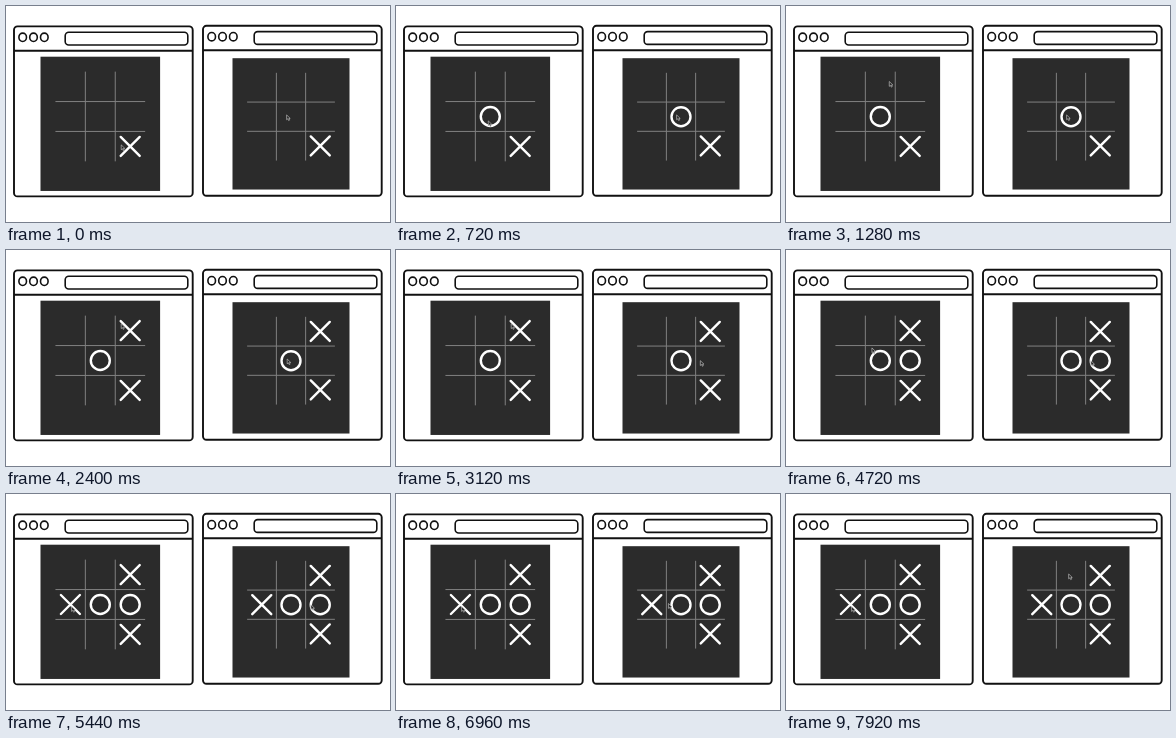
Animation, 384 px wide and 216 px high, one loop 8000 ms. Source, as an HTML page:

```html
<!DOCTYPE html>
<html lang="en">
<head>
<meta charset="utf-8">
<title>Two-player tic-tac-toe</title>
<style>
  html, body { margin: 0; width: 100%; height: 100%; overflow: hidden; background: #fff; }
  svg { display: block; width: 100vw; height: 100vh; }
  .ink { fill: #fff; stroke: #111; stroke-width: 1.9; }
  .thin { stroke-width: 1.6; }
  .grid { fill: none; stroke: #808080; }
  .mark { fill: none; stroke: #fff; stroke-width: 2.4; stroke-linecap: round; }
  .cursor { fill: #222; stroke: #bbb; stroke-width: .7; stroke-linejoin: round; }
</style>
</head>
<body>
<svg id="stage" viewBox="0 0 384 216">
  <defs>
    <g id="window" class="ink">
      <rect x="8" y="20.4" width="178.7" height="170" rx="3.5"/>
      <path d="M8 44.8H186.7"/>
      <rect class="thin" x="59.2" y="26.2" width="122.6" height="12.8" rx="3.5"/>
      <g class="thin">
        <ellipse cx="16.7" cy="31.3" rx="3.8" ry="4.2"/>
        <ellipse cx="27.5" cy="31.3" rx="3.8" ry="4.2"/>
        <ellipse cx="38.3" cy="31.3" rx="3.8" ry="4.2"/>
      </g>
    </g>
    <path id="X" class="mark" d="M-9.5-9.5L9.5 9.5M9.5-9.5L-9.5 9.5"/>
    <circle id="O" class="mark" r="9.5"/>
    <path id="arrow" class="cursor" d="M0 0V4.8L1.2 3.8L2 5.6L2.9 5.2L2.2 3.5H3.6Z"/>
  </defs>
</svg>
<script>
const LOOP = 8000, STEP = 80;
const DELAY = { X: 160, O: 40 }; // until the other player sees a move
const stage = document.getElementById('stage');

// Turns alternate, X first; positions are in cells from the board's centre.
const turns = [
  { at: -DELAY.X, col: 1, row: 1 },
  { at: 40, col: 0, row: 0 },
  { at: 1680, col: 1, row: -1 },
  { at: 3280, col: 1, row: 0 },
  { at: 5280, col: -1, row: 0 }
];

// Each cursor rests at home, then glides: [from ms, to ms, col, row]
const boards = [
  {
    player: 'X', window: [0, 0], centre: [94.3, 110.5], cell: 29.9, home: [.7, .95],
    glides: [[560, 960, -1.48, -1.33], [1040, 1280, .3, -1.17], [1280, 1680, .7, -1.23],
      [3600, 4160, -.7, -.95], [4320, 4640, -.24, -.45], [4640, 5200, -.96, .07]]
  },
  {
    player: 'O', window: [189, -.6], centre: [285, 110.7], cell: 29.25, home: [-.15, -.06],
    glides: [[2320, 3200, .68, 0], [5840, 6240, -.14, .18], [6400, 6640, -.7, -.53],
      [6880, 6960, -.43, -.04], [6960, 7280, -.37, .55], [7280, 7920, -.08, -1.05]]
  }
];

function add(tag, attrs) {
  const el = document.createElementNS('http://www.w3.org/2000/svg', tag);
  for (const key in attrs) el.setAttribute(key, attrs[key]);
  return stage.appendChild(el);
}

const shift = (x, y) => `translate(${x} ${y})`;
const place = ({ centre: [x, y], cell }, col, row) => shift(x + col * cell, y + row * cell);
const ease = k => k * k * (3 - 2 * k);
const clamp = k => Math.min(1, Math.max(0, k));

function build(board) {
  const { centre: [x, y], cell } = board;
  add('use', { href: '#window', transform: shift(...board.window) });
  add('rect', { x: x - 2 * cell, y: y - 2 * cell, width: 4 * cell, height: 4.49 * cell, fill: '#2b2b2b' });
  for (const side of [-.5, .5]) {
    const d = `M${x + side * cell} ${y - 1.5 * cell}v${3 * cell}M${x - 1.5 * cell} ${y + side * cell}h${3 * cell}`;
    add('path', { class: 'grid', d });
  }
  board.marks = turns.map(({ at, col, row }, i) => {
    const symbol = 'XO'[i % 2];
    return {
      at: symbol === board.player ? at : at + DELAY[symbol],
      el: add('use', { href: '#' + symbol, transform: place(board, col, row) })
    };
  });
  board.cursor = add('use', { href: '#arrow' });
}

function locate({ home, glides }, t) {
  let [col, row] = home;
  for (const [from, to, nextCol, nextRow] of glides) {
    const k = ease(clamp((t - from) / (to - from)));
    col += (nextCol - col) * k;
    row += (nextRow - row) * k;
  }
  return [col, row];
}

function draw(now) {
  const t = Math.floor(now % LOOP / STEP) * STEP;
  for (const board of boards) {
    for (const { at, el } of board.marks) el.setAttribute('visibility', t >= at ? 'visible' : 'hidden');
    board.cursor.setAttribute('transform', place(board, ...locate(board, t)));
  }
}

boards.forEach(build);
const start = performance.now();
function tick() {
  draw(performance.now() - start);
  requestAnimationFrame(tick);
}
tick();
</script>
</body>
</html>
```
